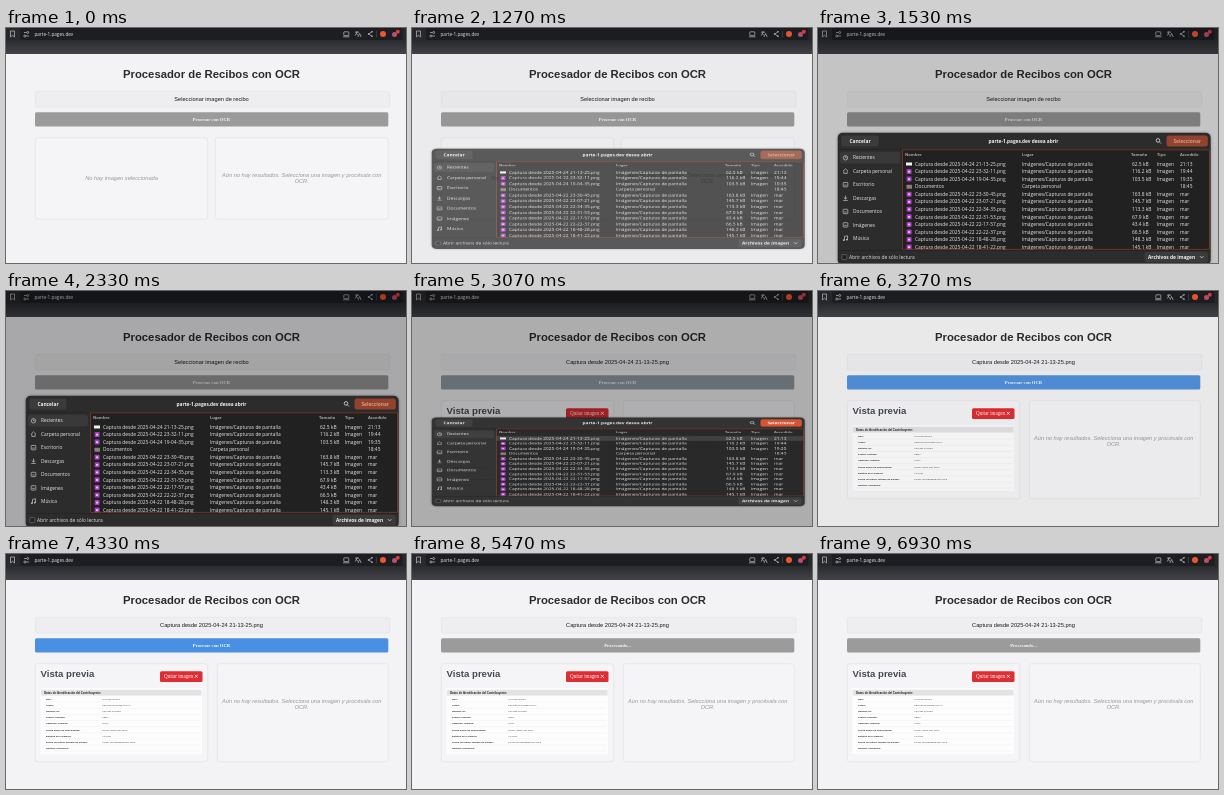
Recreate the animation shown at these times as an HTML page with a canvas. Size 400x235 px, loop 8000 ms.

```html
<!DOCTYPE html>
<html lang="es">
<head>
<meta charset="utf-8">
<title>Procesador de Recibos</title>
<style>
html, body { margin: 0; width: 100%; height: 100%; overflow: hidden; background: #f3f2f4; }
canvas { display: block; width: 400px; height: 235px; }
</style>
</head>
<body>
<canvas id="stage" width="400" height="235"></canvas>
<script>
const view = document.getElementById('stage').getContext('2d');
// The dialog is painted on its own layer so that it can fade and squash as one piece.
const layer = document.createElement('canvas');
layer.width = 400;
layer.height = 245;
const layerCtx = layer.getContext('2d');
let ctx = view;

const LOOP = 8000, OPEN = 1220, SELECT = 2700, LOADED = 3000, CLOSE = 3053, HOVER = 4450, CLICK = 5050;
const SANS = '"Liberation Sans", Arial, sans-serif';
const SERIF = '"Liberation Serif", "Times New Roman", serif';
const UI = '"Open Sans", "Noto Sans", sans-serif';
const GREY = [156, 155, 156], BLUE = [74, 144, 226], NAVY = [53, 122, 189];

const clamp = v => Math.max(0, Math.min(1, v));
const progress = (t, start, length) => clamp((t - start) / length);
const easeOut = u => 1 - (1 - u) * (1 - u);
const smooth = u => u * u * (3 - 2 * u);
const mix = (a, b, u) => a.map((v, i) => v + (b[i] - v) * u);
const rgb = c => `rgb(${c.map(Math.round).join(',')})`;

function rect(x, y, w, h, fill, r = 0, stroke) {
  ctx.beginPath();
  ctx.roundRect(x, y, w, h, r);
  if (fill) { ctx.fillStyle = fill; ctx.fill(); }
  if (stroke) { ctx.strokeStyle = stroke; ctx.stroke(); }
}

function text(s, x, y, size, color, family = SANS, style = '', align = 'left') {
  ctx.font = `${style} ${size}px ${family}`;
  ctx.fillStyle = color;
  ctx.textAlign = align;
  ctx.textBaseline = 'alphabetic';
  ctx.fillText(s, x, y + size * 0.34);
}

function circle(x, y, r, fill, stroke) {
  ctx.beginPath();
  ctx.arc(x, y, r, 0, Math.PI * 2);
  if (fill) { ctx.fillStyle = fill; ctx.fill(); }
  if (stroke) { ctx.strokeStyle = stroke; ctx.stroke(); }
}

function line(color, ...points) {
  ctx.beginPath();
  for (let i = 0; i < points.length; i += 2) ctx.lineTo(points[i], points[i + 1]);
  ctx.strokeStyle = color;
  ctx.stroke();
}

function drawBrowser() {
  const icon = '#c0c0c4';
  rect(0, 0, 400, 12, '#28292d');
  rect(14, 0, 382.5, 12, '#1d1e22', 2);
  const g = ctx.createLinearGradient(0, 12, 0, 26);
  g.addColorStop(0, '#2a2b2f');
  g.addColorStop(1, '#434449');
  rect(0, 12, 400, 14, g);
  ctx.lineWidth = 0.7;
  line(icon, 4.5, 3, 8.5, 3, 8.5, 9, 6.5, 7.3, 4.5, 9, 4.5, 3);
  line(icon, 18, 4.5, 20.5, 4.5);
  line(icon, 20, 8, 23, 8);
  circle(21.7, 4.5, 1, null, icon);
  circle(18.8, 8, 1, null, icon);
  text('parte-1.pages.dev', 28.5, 6.2, 4.65, '#e4e4e6', UI);
  rect(337.8, 3.8, 5, 3.8, null, 0.5, icon);
  line(icon, 337, 8.8, 343.5, 8.8);
  line(icon, 349, 4.2, 353, 4.2);
  line(icon, 351, 3, 351, 4.2, 349.3, 7.5);
  line(icon, 350, 5.3, 352, 7.2);
  line(icon, 352, 9, 353.6, 5.5, 355.2, 9);
  line(icon, 366, 3.8, 362.6, 6, 366, 8.2);
  circle(366, 3.8, 0.8, icon);
  circle(362.6, 6, 0.8, icon);
  circle(366, 8.2, 0.8, icon);
  ctx.lineWidth = 0.5;
  line('#55565b', 370.5, 3, 370.5, 9.5);
  circle(377, 6, 3, '#f0562c');
  circle(388.5, 6.5, 2.5, '#b9506f');
  circle(391.8, 3.8, 2, '#e23b3f');
}

function drawReceipt() {
  rect(34.5, 134, 161.5, 66, '#fdfdfd');
  rect(35, 135.8, 160.5, 5.6, '#e3e2e4');
  text('Datos de Identificación del Contribuyente:', 38, 138.7, 2.85, '#222', SANS, 'bold');
  const rows = [
    ['RFC:', 'XAXX010101P1'],
    ['CURP:', 'XEXX010101HNEXXXA4'],
    ['Nombre (s):', 'VICTOR DANIEL'],
    ['Primer Apellido:', 'VEGA'],
    ['Segundo Apellido:', 'LUNA'],
    ['Fecha inicio de operaciones:', '29 DE ABRIL DE 2004'],
    ['Estatus en el padrón:', 'ACTIVO'],
    ['Fecha de último cambio de estado:', '24 DE NOVIEMBRE DE 2018'],
    ['Nombre Comercial:', '']
  ];
  ctx.lineWidth = 0.3;
  rows.forEach(([label, value], i) => {
    const y = 145.2 + i * 6.1;
    text(label, 40, y, 2.5, '#222', SANS, 'bold');
    text(value, 96, y, 2.5, '#444');
    line('#e2e2e2', 38, y + 3, 194, y + 3);
  });
}

function drawPage(t) {
  const loaded = t >= LOADED, busy = t >= CLICK;
  rect(0, 26, 400, 209, '#f3f2f4');
  text('Procesador de Recibos con OCR', 205.5, 46.3, 11.3, '#2c2c2f', SANS, 'bold', 'center');

  ctx.lineWidth = 0.6;
  rect(29.3, 63.3, 354.4, 15.8, '#eeedef', 1.5, '#e2e1e4');
  text(loaded ? 'Captura desde 2025-04-24 21-13-25.png' : 'Seleccionar imagen de recibo',
    205.5, 71.2, 5.66, '#19191b', SANS, '', 'center');

  let color = mix(GREY, BLUE, smooth(progress(t, LOADED, 330)));
  color = mix(color, NAVY, 0.5 * smooth(progress(t, HOVER, 300)));
  color = mix(color, GREY, smooth(progress(t, CLICK, 320)));
  rect(29, 84.3, 353.3, 14.2, rgb(color), 1.5);
  text(busy ? 'Procesando...' : 'Procesar con OCR', 205.5, 91.5, 4.7, '#f5f5f6', SERIF, 'bold', 'center');

  const h = loaded ? 98 : 81.5, left = loaded ? 211 : 209;
  ctx.lineWidth = 0.6;
  rect(29.3, 109.7, 172.4, h, '#f5f4f6', 2.5, '#dfdee1');
  rect(left + 0.3, 109.7, 382 - left, h, '#f5f4f6', 2.5, '#dfdee1');
  text('Aún no hay resultados. Selecciona una imagen y procésala con', 295.7, 147, 5.66, '#98979a', SANS, 'italic', 'center');
  text('OCR.', 295.7, 153.3, 5.66, '#98979a', SANS, 'italic', 'center');

  if (!loaded) {
    text('No hay imagen seleccionada', 115.5, 150.2, 5.66, '#98979a', SANS, 'italic', 'center');
    return;
  }
  text('Vista previa', 34.6, 120, 9.6, '#444a52', SANS, 'bold');
  rect(154, 117.3, 42.5, 10.6, '#de2d33', 1.5);
  text('Quitar imagen', 158, 122.4, 5.05, '#fff', SERIF);
  ctx.lineWidth = 0.8;
  line('#fff', 188.8, 120.8, 191.8, 123.8);
  line('#fff', 191.8, 120.8, 188.8, 123.8);
  drawReceipt();
}

const FILES = [
  ['24 21-13-25', '62.5', '21:13'], ['22 23-32-11', '116.2', '19:44'],
  ['24 19-04-35', '103.5', '19:35'], null,
  ['22 23-30-45', '163.8'], ['22 23-07-21', '145.7'],
  ['22 22-34-35', '113.3'], ['22 22-31-53', '67.9'],
  ['22 22-17-57', '43.4'], ['22 22-22-37', '66.5'],
  ['22 18-48-28', '148.3'], ['22 18-41-22', '145.1']
];
const PLACES = ['Recientes', 'Carpeta personal', 'Escritorio', 'Descargas', 'Documentos', 'Imágenes', 'Música'];

function placeIcon(i, y) {
  const c = '#c8c8c8';
  ctx.lineWidth = 0.7;
  if (i === 0) {
    circle(27.5, y, 2.2, null, c);
    line(c, 27.5, y - 1.4, 27.5, y, 28.8, y);
  } else if (i === 1) {
    line(c, 25, y, 27.5, y - 2.4, 30, y);
    line(c, 25.8, y, 25.8, y + 2.2, 29.2, y + 2.2, 29.2, y);
  } else if (i === 3) {
    line(c, 27.5, y - 2.5, 27.5, y + 1);
    line(c, 25.8, y - 0.5, 27.5, y + 1, 29.2, y - 0.5);
    line(c, 25.2, y + 2.4, 29.8, y + 2.4);
  } else if (i === 6) {
    line(c, 26.5, y + 1.8, 26.5, y - 2, 29.5, y - 2.5, 29.5, y + 1.3);
    circle(25.9, y + 1.8, 0.9, c);
    circle(28.9, y + 1.3, 0.9, c);
  } else {
    rect(25.2, y - 2.2, 4.6, 4.4, null, 0.6, c);
    line(c, 26.3, y + 0.5, 28.7, y + 0.5);
  }
}

function drawFiles(selected) {
  const head = [['Nombre', 87], ['Lugar', 204], ['Tamaño', 313], ['Tipo', 339], ['Accedido', 362]];
  rect(84, 121.5, 308, 100.5, '#212121');
  head.forEach(([s, x]) => text(s, x, 126.5, 4.1, '#aaa', UI, 'bold'));
  if (selected) rect(84, 132.2, 308, 7.6, '#3d3b3b');
  const cell = (s, x, y) => text(s, x, y, 4.87, '#e6e6e6', UI);
  FILES.forEach((file, i) => {
    const y = 136 + i * 7.55;
    if (!file) {
      rect(88.5, y - 2, 5.5, 4.2, '#8b7d78', 0.6);
      cell('Documentos', 97, y);
      cell('Carpeta personal', 204, y);
      cell('18:45', 362, y);
      return;
    }
    const [stamp, size, time = 'mar'] = file;
    if (i) {
      rect(88.6, y - 2.5, 5, 5, '#a63cc0', 0.8);
      rect(90, y - 0.8, 2.2, 1.8, '#e9c3f0');
    } else {
      rect(88, y - 1.5, 6, 3, '#f2f2f2');
    }
    cell(`Captura desde 2025-04-${stamp}.png`, 97, y);
    cell('Imágenes/Capturas de pantalla', 204, y);
    cell(size + ' kB', 314, y);
    cell('Imagen', 339, y);
    cell(time, 362, y);
  });
  ctx.lineWidth = 0.7;
  rect(84.5, 121.8, 307, 99.6, null, 0, '#8f3d26');
}

function paintDialog(selected) {
  ctx.clearRect(0, 0, layer.width, layer.height);
  ctx.lineWidth = 0.6;
  ctx.shadowColor = 'rgba(0,0,0,.3)';
  ctx.shadowBlur = 3;
  rect(19.7, 104.7, 373, 132.2, '#2c2c2c', 5);
  ctx.shadowBlur = 0;

  rect(23.5, 107.6, 37, 11, '#3b3b3b', 2.5);
  text('Cancelar', 42, 113, 4.85, '#f2f2f2', UI, 'bold', 'center');
  text('parte-1.pages.dev desea abrir', 205.5, 113, 4.75, '#f2f2f2', UI, 'bold', 'center');
  ctx.lineWidth = 0.8;
  circle(340, 112.4, 1.8, null, '#ddd');
  line('#ddd', 341.3, 113.8, 343, 115.5);
  rect(348.5, 107.4, 41.3, 11.2, selected ? '#da4f2c' : '#93432d', 2.5);
  text('Seleccionar', 369.2, 113, 4.85, selected ? '#fff' : '#d79a88', UI, 'bold', 'center');
  rect(20, 121.2, 372.5, 0.5, '#1c1c1c');

  rect(22, 123.8, 60, 11.8, '#393939', 2.5);
  PLACES.forEach((name, i) => {
    const y = 129.8 + i * 13.42;
    placeIcon(i, y);
    text(name, 35, y, 4.87, '#e6e6e6', UI);
  });
  drawFiles(selected);

  ctx.lineWidth = 0.6;
  rect(20, 222, 372.5, 0.5, '#1c1c1c');
  rect(23.8, 226.6, 5, 5, '#222', 1, '#777');
  text('Abrir archivos de sólo lectura', 31, 229, 4.87, '#e0e0e0', UI);
  rect(326.5, 223.8, 63.3, 10.8, '#3b3b3b', 2.5);
  text('Archivos de imagen', 330, 229, 4.85, '#f2f2f2', UI, 'bold');
  ctx.lineWidth = 0.8;
  line('#ddd', 382, 228.2, 383.7, 229.9, 385.4, 228.2);
}

function drawDialog(t) {
  const closing = t >= CLOSE;
  const scale = closing ? 1 - easeOut(progress(t, CLOSE, 100)) : easeOut(progress(t, OPEN, 100));
  if (scale <= 0) return;
  ctx = layerCtx;
  paintDialog(t >= SELECT);
  ctx = view;
  ctx.save();
  ctx.translate(0, 170.8);
  ctx.scale(1, scale);
  ctx.translate(0, -170.8);
  ctx.globalAlpha = closing ? Math.min(1, scale * 1.4) : scale;
  ctx.drawImage(layer, 0, 0);
  ctx.restore();
}

function draw(t) {
  drawBrowser();
  drawPage(t);
  // The window first shows half-way through its opening.
  if (t < 1265) return;
  const dim = 0.31 * (t < CLOSE ? progress(t, OPEN, 500) : 1 - progress(t, CLOSE, 250));
  if (dim > 0) rect(0, 0, 400, 235, `rgba(0,0,0,${dim})`);
  drawDialog(t);
}

const start = performance.now();
function tick() {
  draw((performance.now() - start) % LOOP);
  requestAnimationFrame(tick);
}
tick();
</script>
</body>
</html>
```
